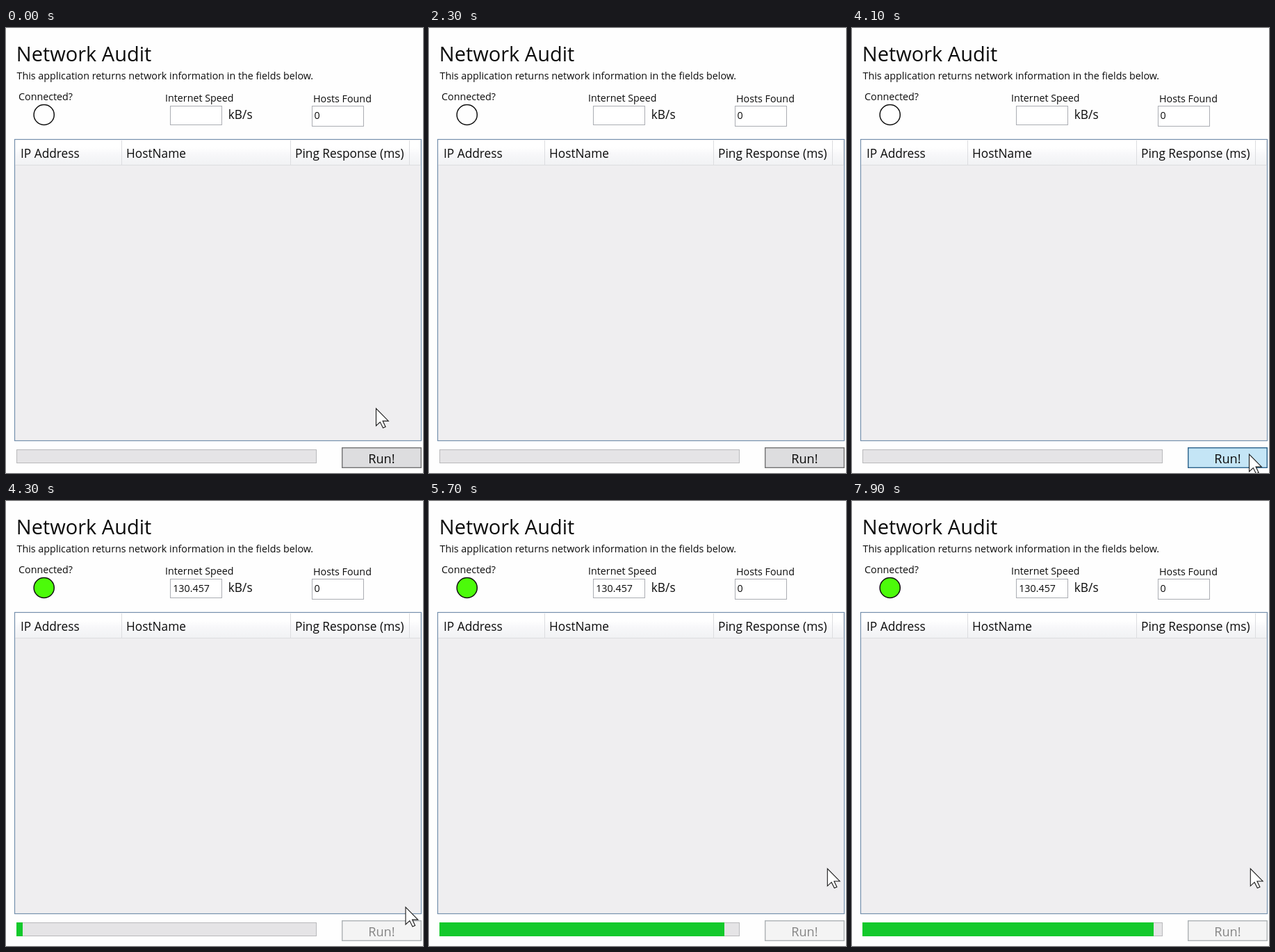
Animation, 600 px wide and 641 px high, one loop 8000 ms. Source, as an HTML page:

```html
<!DOCTYPE html>
<html lang="en">
<head>
<meta charset="utf-8">
<title>Network Audit</title>
<style>
html, body { margin: 0; width: 100%; height: 100%; overflow: hidden; background: #fefefe; }
svg { display: block; width: 600px; height: 641px; font: 14.3px "Open Sans", "Noto Sans", sans-serif; fill: #0c0c0c; }
.big { font-size: 17.3px; }
.box { fill: #fff; stroke: #abadb3; }
.line { stroke: #dcdde0; }
</style>
</head>
<body>
<svg viewBox="0 0 600 641">
  <defs>
    <linearGradient id="head" x2="0" y2="1">
      <stop offset=".3" stop-color="#fff"/>
      <stop offset=".55" stop-color="#f8f8fa"/>
      <stop offset="1" stop-color="#f1f2f4"/>
    </linearGradient>
  </defs>

  <text x="14.8" y="47.6" font-size="29">Network Audit</text>
  <text x="15.5" y="74" font-size="14.32">This application returns network information in the fields below.</text>
  <text x="18" y="104">Connected?</text>
  <text x="229" y="106.2">Internet Speed</text>
  <text x="442" y="107.2">Hosts Found</text>
  <circle id="lamp" cx="54.7" cy="125" r="14.6" stroke="#111" stroke-width="1.5"/>

  <rect class="box" x="236.5" y="112.5" width="74" height="27"/>
  <text id="speed" x="240.2" y="131">130.457</text>
  <text class="big" x="319.8" y="131">kB/s</text>
  <rect class="box" x="440.5" y="112.5" width="74" height="29"/>
  <text x="443.6" y="131">0</text>

  <rect x="12.5" y="160.5" width="585" height="434" fill="#efeef0" stroke="#7590ad" stroke-width="1.2"/>
  <rect x="13.5" y="161.5" width="583" height="35.5" fill="url(#head)"/>
  <path class="line" d="M13 197.5H597M166.5 162V197M409.5 162V197M580.5 162V197M596.5 162V197"/>
  <g class="big">
    <text x="21" y="187">IP Address</text>
    <text x="173" y="187">HostName</text>
    <text x="416" y="187">Ping Response (ms)</text>
  </g>

  <rect x="15.5" y="607.5" width="431" height="19" fill="#e5e4e6" stroke="#b9b9bb"/>
  <rect id="bar" x="15" y="607" height="20" fill="#13c92b"/>

  <rect id="button" x="483.7" y="604.7" width="113.6" height="28.6" stroke-width="1.4"/>
  <text id="label" x="521.2" y="627" font-size="18.2">Run!</text>

  <path id="cursor" d="M0 0V25L5.8 19.6L10 28L13.6 26.4L9.6 18.1H17.8Z" fill="#fff" stroke="#1a1a1a" stroke-width="1.1"/>
</svg>
<script>
const LOOP = 8000;
const $ = id => document.getElementById(id);
const set = (id, attrs) => {
  for (const k in attrs) $(id).setAttribute(k, attrs[k]);
};

// Each track is a list of [start ms, value]; values hold until the next start.
const at = (track, t) => track.filter(([start]) => start <= t).pop()[1];

const looks = {
  normal: ["#dddddf", "#747474", "#0c0c0c"],
  hover: ["#bee6fd", "#3c7fb1", "#0c0c0c"],
  pressed: ["#c4e5f6", "#2c628b", "#0c0c0c"],
  disabled: ["#f4f4f4", "#adb2b5", "#858585"]
};
const button = [[0, "normal"], [2400, "hover"], [3500, "pressed"], [4200, "disabled"]];
const bar = [[0, 0], [4300, 9], [5700, 410], [6100, 419]];
const away = [700, 700];
const cursor = [
  [0, [532.5, 548]], [700, away], [2400, [580, 628]], [2500, [571.5, 618.8]],
  [4100, [571.5, 614]], [4300, [575, 585]], [4400, [576, 568]], [4600, [573.3, 529.6]]
];

function draw(t) {
  const [fill, stroke, ink] = looks[at(button, t)];
  const online = t >= 4200;
  set("button", { fill, stroke });
  set("label", { fill: ink });
  set("lamp", { fill: online ? "#4cfb0a" : "#fefefe" });
  set("speed", { visibility: online ? "visible" : "hidden" });
  set("bar", { width: at(bar, t) });
  set("cursor", { transform: `translate(${at(cursor, t)})` });
}

const begin = performance.now();
function tick() {
  draw((performance.now() - begin) % LOOP);
  requestAnimationFrame(tick);
}
tick();
</script>
</body>
</html>
```
